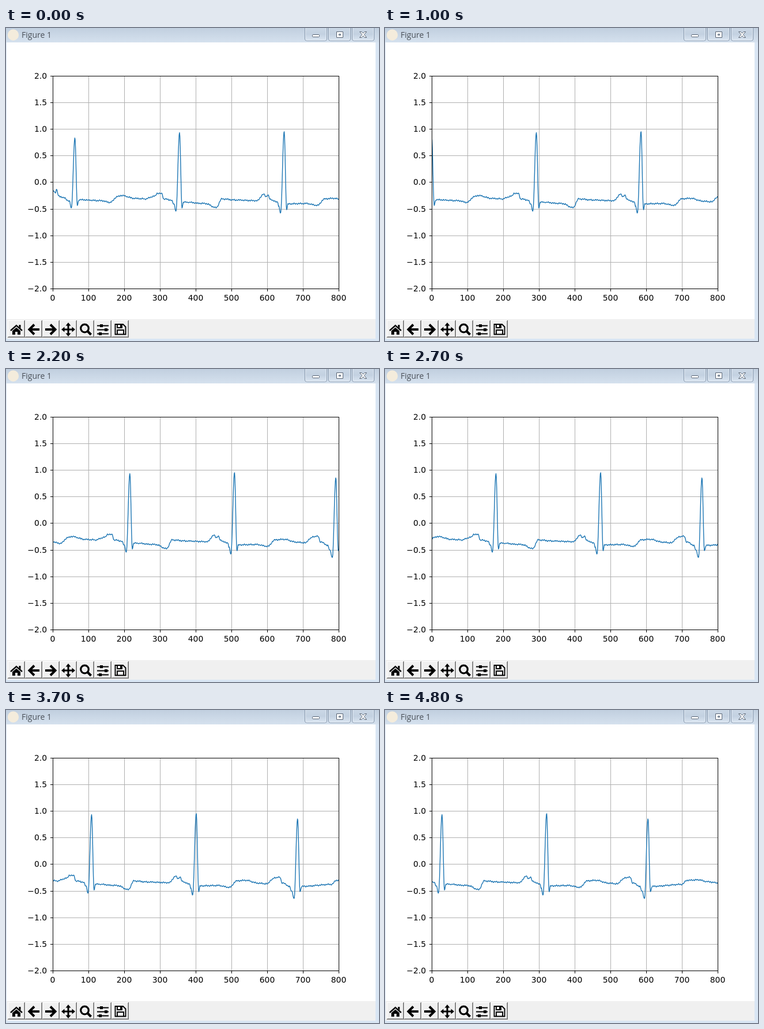
An HTML page for the animation above (4900 ms loop, 647x543 px).

```html
<!DOCTYPE html>
<html lang="en">
<head>
<meta charset="utf-8">
<title>Figure 1</title>
<style>
  html, body { margin: 0; width: 100%; height: 100%; overflow: hidden; background: #d9e6f4; }
  svg { display: block; }
  .crisp { shape-rendering: crispEdges; }
  .label { font: 13.9px "DejaVu Sans", sans-serif; }
  .title { font: 14px "Open Sans", sans-serif; fill: #4a5058; }
  .icon path, .icon circle { fill: none; stroke: #000; }
  .icon .solid { fill: #000; stroke: none; }
</style>
</head>
<body>
<svg width="647" height="543" viewBox="0 0 647 543">
  <defs>
    <linearGradient id="bar" x2="0" y2="1">
      <stop offset="0" stop-color="#c1cfdf"/><stop offset="1" stop-color="#d5e1ee"/>
    </linearGradient>
    <linearGradient id="key" x2="0" y2="1">
      <stop offset="0" stop-color="#cbd8e6"/><stop offset=".5" stop-color="#c3d1e1"/><stop offset="1" stop-color="#dbe6f2"/>
    </linearGradient>
    <clipPath id="axes"><rect x="81" y="83" width="497" height="370"/></clipPath>
  </defs>

  <rect width="647" height="25" fill="url(#bar)"/>
  <circle cx="12.5" cy="12" r="9.7" fill="#f4ecdc"/>
  <text class="title" x="27" y="17">Figure 1</text>
  <g id="keys" fill="url(#key)" stroke="#8092a8"></g>
  <g fill="#fff" stroke="#596575">
    <rect x="531.5" y="11.5" width="12" height="4" rx="1"/>
    <path fill-rule="evenodd" d="M573.5 6.5h11v10h-11zM577.5 10.5h3v2h-3z"/>
    <path d="M613.5 6.5h3.5l2.5 2.7 2.5-2.7h3.5l-4.2 4.9 4.2 5.1h-3.5l-2.5-2.9-2.5 2.9h-3.5l4.2-5.1z"/>
  </g>

  <rect x="1" y="25" width="640" height="480" fill="#fff"/>
  <rect x="1" y="505" width="640" height="34" fill="#f0f0f0"/>
  <g id="grid" class="crisp" fill="none"></g>
  <g id="labels" class="label"></g>
  <polyline id="curve" clip-path="url(#axes)" transform="translate(.5 .5)" fill="none" stroke="#1f77b4" stroke-width="1.4" stroke-linejoin="round"/>
  <path class="crisp" d="M81.5 83.5h496v369h-496z" fill="none" stroke="#000"/>

  <g id="buttons" class="crisp"></g>
  <g class="icon">
    <path d="M8 525L18 516L28 525" stroke-width="2.4"/>
    <path class="solid" d="M22.5 515h3v6l-3-2.5zM11 525.5l7-6 7 6v6.5h-5v-5h-4v5h-5z"/>
    <path id="arrow" d="M58 523H42M49 514.5L40.5 523L49 531.5" stroke-width="4"/>
    <use href="#arrow" transform="matrix(-1 0 0 1 126 0)"/>
    <path d="M100 523h16M108 515v16" stroke-width="3"/>
    <path class="solid" d="M108 511l4.5 5.5h-9zM108 535l4.5-5.5h-9zM96 523l5.5-4.5v9zM120 523l-5.5-4.5v9z"/>
    <circle cx="136.5" cy="521" r="6.8" stroke-width="3.2"/>
    <path d="M141.5 526l6 6" stroke-width="4.2"/>
    <path d="M158 516.5h20M158 523.5h20M158 530.5h20" stroke-width="2"/>
    <path class="solid" d="M163 514h5v5h-5zM171 521h5v5h-5zM161 528h5v5h-5z"/>
    <path d="M189.5 514h13.5l4.5 4.5v13h-18zM193 531v-7h11v7M193 514v6h8v-6" stroke-width="1.9"/>
    <path class="solid" d="M198 514h3v5h-3z"/>
  </g>
</svg>
<script>
const el = id => document.getElementById(id);
const range = n => [...Array(n).keys()];

el('keys').innerHTML = [518.5, 559.5, 600.5].map(x =>
  `<path d="M${x} -1v20q0 3 3 3h32q3 0 3-3v-20z"/>
   <path d="M${x + 1} 0v19q0 2 2 2h32q2 0 2-2v-19" fill="none" stroke="#e6eef7"/>`).join('');

el('buttons').innerHTML = range(7).map(i => {
  const square = (color, inset, size) =>
    `<rect x="${3 + 30 * i + inset}" y="${507 + inset}" width="${size}" height="${size}" fill="${color}"/>`;
  return square('#696969', 0, 30) + square('#fff', 0, 29) + square('#a0a0a0', 1, 28) + square('#f0f0f0', 1, 27);
}).join('');

// Grid, ticks and tick labels
const gridX = i => 81.5 + 62 * i;
const gridY = i => Math.round(82.6 + 46.2 * i) + .5;
el('grid').innerHTML =
  `<path stroke="#b0b0b0" d="${range(9).map(i => `M${gridX(i)} 83V453M81 ${gridY(i)}H578`).join('')}"/>
   <path stroke="#000" d="${range(9).map(i => `M${gridX(i)} 453v4M81 ${gridY(i)}h-4`).join('')}"/>`;
el('labels').innerHTML = range(9).map(i =>
  `<text x="${81 + 62 * i}" y="473" text-anchor="middle">${100 * i}</text>
   <text x="71" y="${gridY(i) + 4.5}" text-anchor="end">${(2 - i / 2).toFixed(1).replace('-', '\u2212')}</text>`).join('');

// A heartbeat spike: dip, peak, second dip, then back to the resting line
const spike = (x, dip, peak, dip2) =>
  [[x - 9.7, dip - 12], [x - 6.1, dip], [x, peak], [x + 4.3, dip2], [x + 7, dip2 - 9.5]];
const pairs = (...n) => range(n.length / 2).map(i => [n[2 * i], n[2 * i + 1]]);

// Turning points of the trace
const knots = [
  ...pairs(81, 281, 85, 285, 87, 280, 91, 291, 100, 294),
  ...spike(119, 312, 190, 307),
  ...pairs(165, 299, 180, 302, 193, 292, 200, 290, 222, 295, 240, 296, 258, 291, 262, 286, 270, 287, 273, 296, 286, 298),
  ...spike(300.5, 317, 181, 311),
  ...pairs(345, 304, 364, 311, 374, 296, 400, 298, 435, 299, 446, 288, 451, 292, 453.5, 289, 458, 297, 471, 302),
  ...spike(482, 320, 179, 314),
  ...pairs(520, 304, 540, 307, 552, 296, 568, 295, 590, 300, 605, 301, 613, 294, 619, 290, 627, 290, 631, 299, 643, 305),
  ...spike(657.8, 327, 188, 315),
  ...pairs(717, 302, 725, 295, 747, 294, 757, 297, 785, 300)
];

let seed = 7;
const random = () => (seed = seed * 16807 % 2147483647) / 2147483647;

// One sample per data unit, 0.62 px apart
const samples = range(1130).map(d => {
  const x = 81 + d * .62;
  const k = Math.max(1, knots.findIndex(p => p[0] > x));
  const [x0, y0] = knots[k - 1], [x1, y1] = knots[k];
  const y = y0 + (y1 - y0) * (1 - Math.cos(Math.PI * (x - x0) / (x1 - x0))) / 2;
  const ripple = .75 * Math.sin(d * 1.05) + .45 * Math.sin(d * .37) + .7 * (random() - .5);
  return y > 280 ? y + ripple : y;
});

// Scroll offset in samples at given steps
const scroll = pairs(0, 0, 6, 37, 14, 87, 22, 139, 32, 210, 42, 281, 48, 326);
function offset(step) {
  const k = Math.max(1, scroll.findIndex(p => p[0] >= step));
  const [s0, d0] = scroll[k - 1], [s1, d1] = scroll[k];
  return Math.round(d0 + (d1 - d0) * (step - s0) / (s1 - s0));
}

const start = performance.now();
let shown = -1;
function draw() {
  const step = Math.floor((performance.now() - start) % 4900 / 100);
  if (step !== shown) {
    shown = step;
    const from = offset(step);
    el('curve').setAttribute('points', samples.slice(from, from + 801)
      .map((y, i) => `${(81 + i * .62).toFixed(2)},${y.toFixed(2)}`).join(' '));
  }
  requestAnimationFrame(draw);
}
draw();
</script>
</body>
</html>
```
